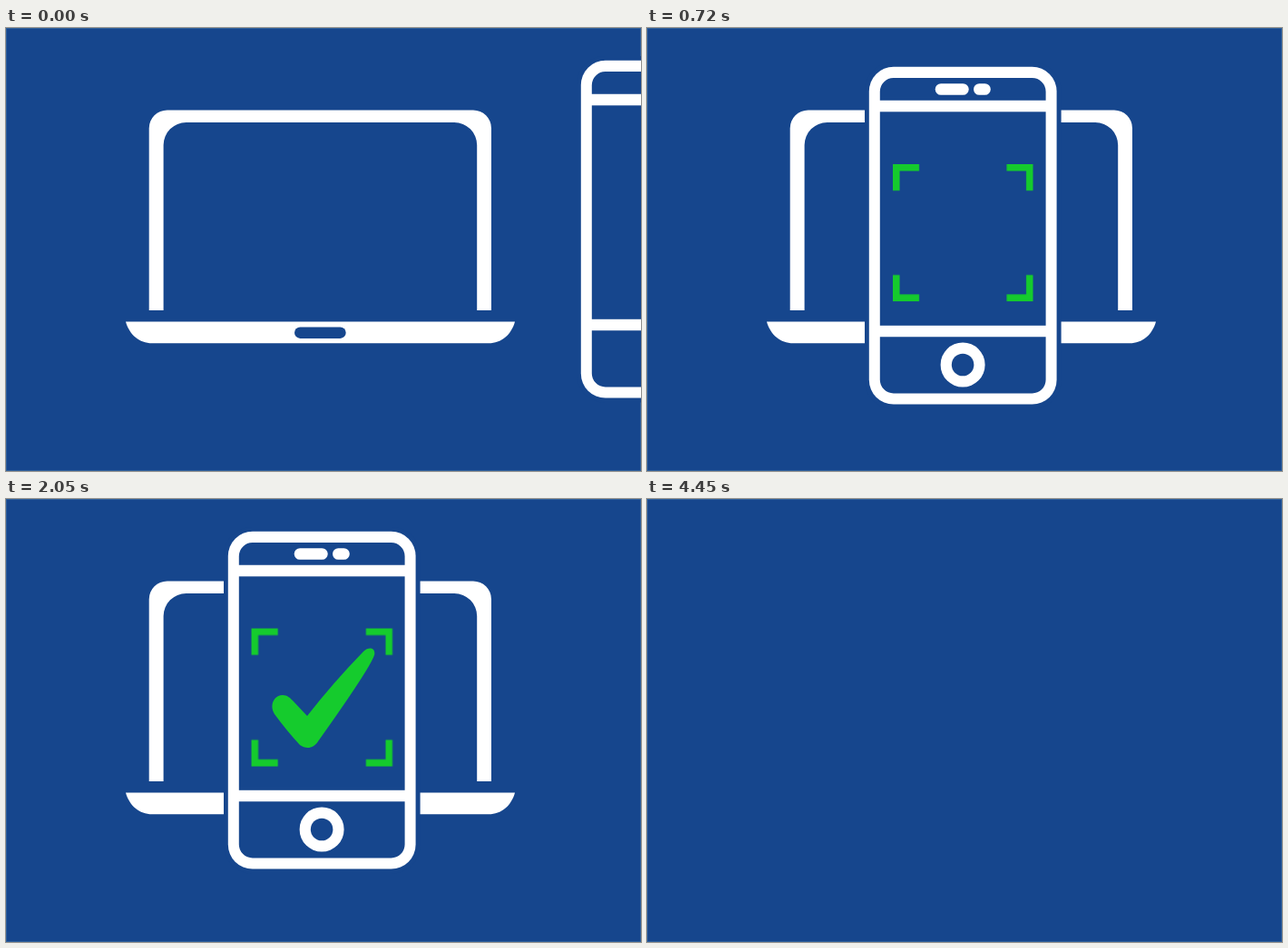
Write an HTML page that moves like this. It is 700 by 488 pixels and loops after 4690 ms.

```html
<!DOCTYPE html>
<html lang="en">
<head>
<meta charset="utf-8">
<title>Phone scan</title>
<style>
  :root { --blue: #16468d; --green: #15cb2d; --loop: 4690ms; }
  html, body { margin: 0; width: 100%; height: 100%; overflow: hidden; background: var(--blue); }
  svg { display: block; width: 100%; height: 100%; }
  .white { fill: #fff; }
  .blue { fill: var(--blue); }
  .green { fill: var(--green); }
  .edge { fill: none; stroke: #30609a; }

  .fade { animation: fade var(--loop) infinite; }
  .phone { animation: move var(--loop) infinite; }
  .finder { animation: show var(--loop) step-end infinite; }
  .focus { transform-origin: 348px 218px; animation: focus var(--loop) infinite; }
  .tick { animation: tick var(--loop) infinite; }

  /* Slide in until 640 ms, down until 1080 ms, back up until 1520 ms */
  @keyframes move {
    0% { transform: translate(389px, 0); animation-timing-function: steps(16); }
    13.6461% { transform: translate(0, 0); animation-timing-function: steps(11); }
    23.0277% { transform: translate(0, 38.5px); animation-timing-function: steps(11); }
    32.4094%, 100% { transform: translate(0, 0); }
  }
  @keyframes show {
    0% { opacity: 0; }
    13.6461%, 100% { opacity: 1; }
  }
  /* 1810 to 2050 ms */
  @keyframes focus {
    0%, 38.5928% { transform: scale(1); animation-timing-function: steps(6); }
    43.71%, 100% { transform: scale(1.006); }
  }
  @keyframes tick {
    0%, 38.5928% { opacity: 0; animation-timing-function: steps(6); }
    43.71%, 100% { opacity: 1; }
  }
  /* 4010 to 4450 ms */
  @keyframes fade {
    0%, 85.5011% { opacity: 1; animation-timing-function: steps(11); }
    94.8827%, 100% { opacity: 0; }
  }
</style>
</head>
<body>
<svg viewBox="0 0 700 488" xmlns="http://www.w3.org/2000/svg">
  <rect class="edge" x=".5" y=".5" width="699" height="487"/>

  <g class="fade">
    <path class="white" d="M157.7 311V110.4a20 20 0 0 1 20-20H515a20 20 0 0 1 20 20V311H519.2V129a25 25 0 0 0-25-25H198.6a25 25 0 0 0-25 25V311Z"/>
    <path class="white" d="M132 323.5H561C557 338 546 347.3 532 347.3H161C147 347.3 136 338 132 323.5Z"/>
    <rect class="blue" x="318" y="329.4" width="56.7" height="12.5" rx="6.25"/>
  </g>

  <g class="fade">
    <g class="phone">
      <rect class="blue" x="240" y="31" width="216.6" height="381.6" rx="31"/>
      <rect class="white" x="244.8" y="35.8" width="206.8" height="371.8" rx="27"/>
      <path class="blue" d="M256.8 72.8V63a15 15 0 0 1 15-15H424.6a15 15 0 0 1 15 15V72.8Z"/>
      <rect class="blue" x="256.8" y="85.3" width="182.8" height="235.5"/>
      <path class="blue" d="M256.8 333.3H439.6V380.4a15 15 0 0 1-15 15H271.8a15 15 0 0 1-15-15Z"/>
      <rect class="white" x="317.7" y="54.2" width="37" height="12.6" rx="6.3"/>
      <rect class="white" x="360" y="54.2" width="18.8" height="12.6" rx="6.3"/>
      <circle class="white" cx="348.1" cy="364" r="24.5"/>
      <circle class="blue" cx="348.1" cy="364" r="12.3"/>

      <g class="finder">
        <path class="green focus" d="M271 143h29v7.5h-21.5v21.5h-7.5ZM425.5 143v29h-7.5v-21.5h-21.5v-7.5ZM271 294v-29h7.5v21.5h21.5v7.5ZM425.5 294h-29v-7.5h21.5v-21.5h7.5Z"/>
      </g>
      <path class="green tick" d="M296 237C290 228 295 216 305 216C310 216 313 219 316 222L332 239Q360 203 394 168C400 162 408 164 406 172Q401 187 344 267C339 275 331 276 324 271Q310 256 296 237Z"/>
    </g>
  </g>
</svg>
</body>
</html>
```
